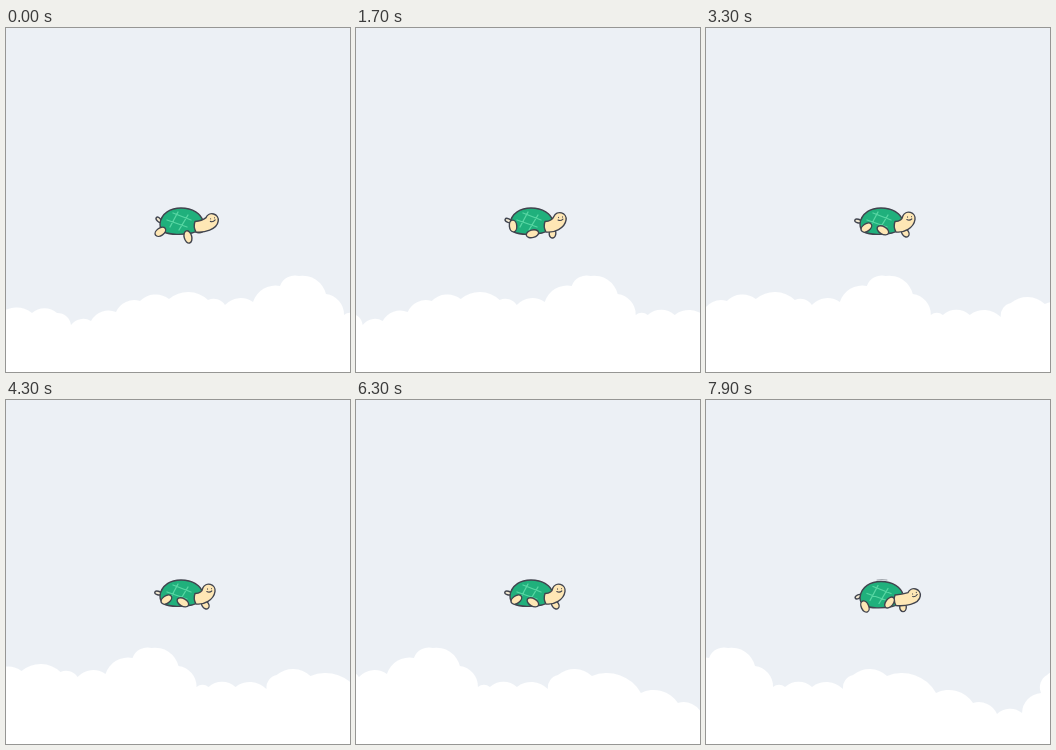
These frames come from a looping animation (344x344 px, 8 s). An HTML page:

```html
<!DOCTYPE html>
<html lang="en">
<head>
<meta charset="utf-8">
<title>Turtle above the clouds</title>
<style>
html, body { margin: 0; width: 100%; height: 100%; overflow: hidden; background: #ecf0f5; }
svg { display: block; width: 100vw; height: 100vh; }
.ink { stroke: #41444e; stroke-width: 1.4; stroke-linejoin: round; stroke-linecap: round; }
.skin { fill: #fee7b5; }
.line { fill: none; stroke-linecap: round; }
</style>
</head>
<body>
<svg viewBox="0 0 344 344">
  <rect width="344" height="344" fill="#ecf0f5"/>
  <path id="clouds" fill="#fff"/>
  <path id="trace" class="line" d="M171 180Q176 179 181 180" stroke="#8d929a" stroke-width=".8"/>
  <g id="turtle">
    <ellipse id="tail" class="ink" rx="3.2" ry="1.8" fill="#f3ead2"/>
    <ellipse id="far" class="ink skin" rx="4.6" ry="3.3"/>
    <path class="ink" fill="#20b07c" d="M154 196C155 185 165 180 175 180C187 180 195 186 197 193C196 199 192 204 186 205C177 207 164 207 158 204C155 202 154 199 154 196Z"/>
    <path class="line" stroke="#58d6a3" stroke-width="1.3" d="M164 199L172 184M173 202L182 187M161 192L181 199M167 185L185 192"/>
    <path id="neck" class="ink skin"/>
    <g id="face" class="line" stroke="#41444e">
      <path d="M-2 1.4Q.5 3 3 1" stroke-width="1.1"/>
      <path d="M-1.2 -1.2v.3M2.8 -1.4v.3" stroke-width="1"/>
    </g>
    <ellipse id="rear" class="ink skin" rx="5.9" ry="3.7"/>
    <ellipse id="front" class="ink skin" rx="6.3" ry="3.8"/>
  </g>
</svg>
<script>
const LOOP = 8000, STEP = 100, SPEED = 0.0343;
const $ = id => document.getElementById(id);

// The cloud bank is a chain of arcs between these notches.
const notches = [
  [-6, 286], [26, 285], [51, 285], [65, 297], [85, 293], [110, 284], [134, 273],
  [163, 271], [202, 272], [219, 277], [247, 274], [274, 258], [293, 248], [320, 266],
  [338, 287], [350, 287], [377, 287], [408, 289], [418, 275], [452, 276], [501, 293],
  [538, 303], [562, 314], [587, 313], [606, 293], [612, 275], [650, 275]
];
const arcs = notches.slice(1).map(([x, y], i) => {
  const [px, py] = notches[i];
  const r = 0.75 * Math.hypot(x - px, y - py);
  return `A${r} ${r} 0 0 1 ${x} ${y}`;
});
$('clouds').setAttribute('d', `M-6 350V286${arcs.join('')}V350Z`);

// Limbs turn about a joint; angles are for glide, pull and reach.
const limbs = {
  tail: { joint: [154.8, 193.8], length: 3, angles: [225, 195, 153] },
  far: { joint: [197, 201.5], length: 4, angles: [180, 55, 90] },
  rear: { joint: [157.4, 201.7], length: 3.7, angles: [145, 325, 425] },
  front: { joint: [180.8, 204.6], length: 4.5, angles: [75, 210, 308] }
};
const headAngles = [-25, -34, -19];

// Three even steps from glide to pull, then one step of reach.
const turn = ([glide, pull, reach], beat) =>
  beat < 4 ? glide + (pull - glide) * beat / 3 : reach;

const polar = ([x, y], length, angle) => {
  const a = angle * Math.PI / 180;
  return [x + length * Math.cos(a), y + length * Math.sin(a)];
};

function setLimb(id, beat) {
  const { joint, length, angles } = limbs[id];
  const angle = turn(angles, beat);
  const [x, y] = polar(joint, length, angle);
  $(id).setAttribute('transform', `translate(${x} ${y}) rotate(${angle})`);
}

// The neck grows longer as it is lowered.
function setHead(beat) {
  const angle = turn(headAngles, beat);
  const [x, y] = polar([188, 200], 25.5 + angle * 0.225, angle);
  $('neck').setAttribute('d', `M189 193.5Q196 193 ${x - 6} ${y - 2}` +
    `A6.4 6.4 0 0 1 ${x + 6.2} ${y + 1.5}C${x + 5} ${y + 10} 198 205 190 204Q187 199 189 193.5Z`);
  $('face').setAttribute('transform', `translate(${x} ${y}) rotate(${-1.2 * (angle + 35)})`);
}

function draw(time) {
  const step = Math.floor((time % LOOP) / STEP);
  const beat = step % 5;
  const dip = step % 10 === 9;
  $('clouds').setAttribute('transform', `translate(${-step * STEP * SPEED} 0)`);
  Object.keys(limbs).forEach(id => setLimb(id, beat));
  setHead(beat);
  $('turtle').setAttribute('transform', `translate(0 ${dip ? 1.5 : 0})`);
  $('trace').setAttribute('visibility', dip ? 'visible' : 'hidden');
}

const start = performance.now();
function tick() {
  draw(performance.now() - start);
  requestAnimationFrame(tick);
}
tick();
</script>
</body>
</html>
```
